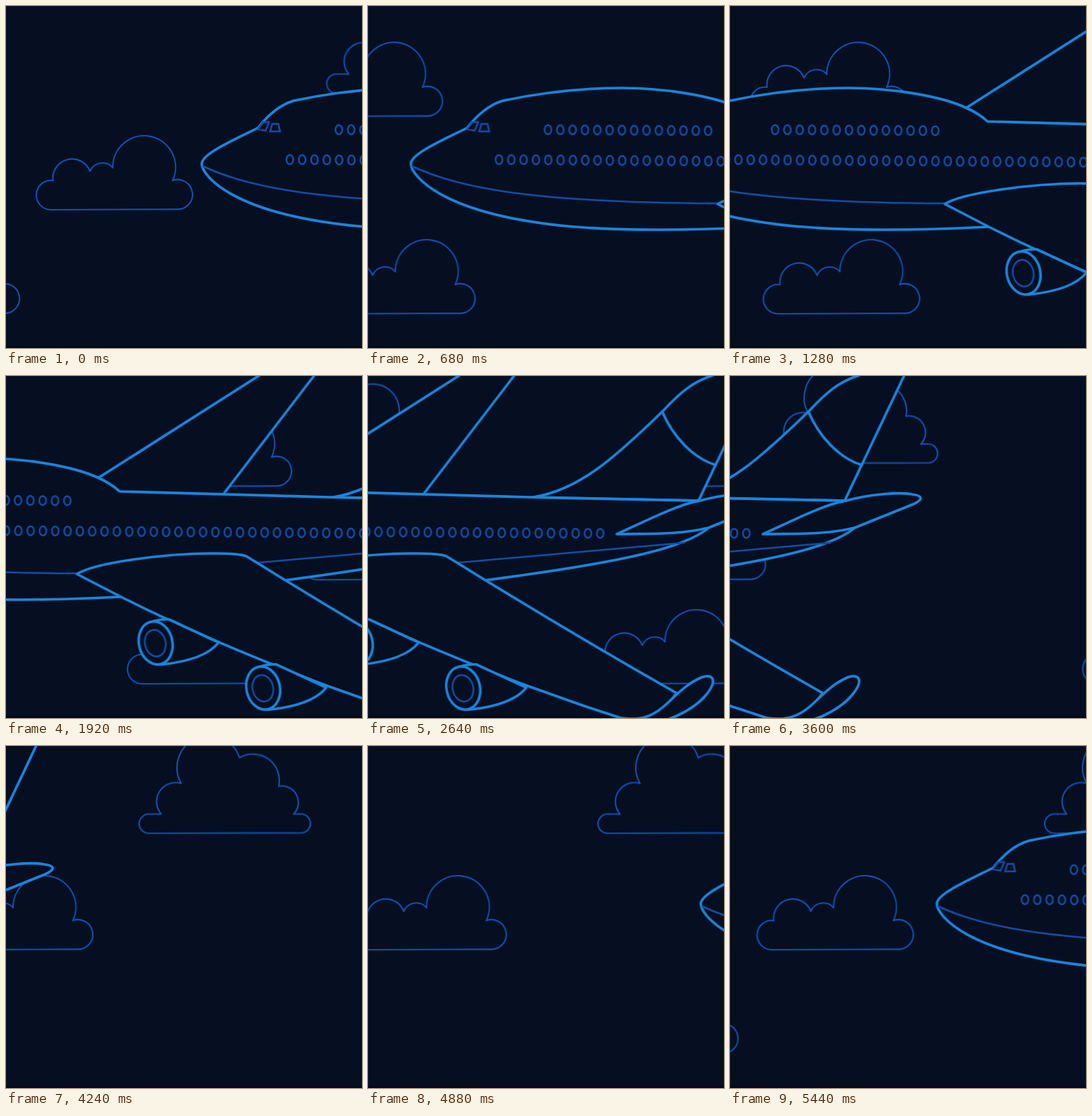
An HTML page for the animation above (5480 ms loop, 500 by 480 pixels).

```html
<!DOCTYPE html>
<html lang="en">
<head>
<meta charset="utf-8">
<title>Airliner in the clouds</title>
<style>
  html, body { margin: 0; width: 100%; height: 100%; overflow: hidden; background: #050f21; }
  svg { display: block; width: 500px; height: 480px; overflow: hidden; }

  .sky { fill: #050f21; }
  .edge { fill: none; stroke: #0e1829; }
  .floor { fill: #030916; }

  .cloud { fill: none; stroke: #124fae; stroke-width: 2.1; stroke-linejoin: round; }
  .body { fill: #050f21; stroke: #1886de; stroke-width: 3.6; stroke-linejoin: round; stroke-linecap: round; }
  .line { fill: none; }
  .trim { fill: none; stroke: #124da4; stroke-width: 2.5; stroke-linecap: round; }

  /* every part drifts from --a to --b at a constant speed, 25 pictures a second */
  .drift { animation: drift 5480ms steps(137) -10ms infinite; }
  @keyframes drift {
    from { transform: translateX(var(--a)); }
    to { transform: translateX(var(--b)); }
  }
</style>
</head>
<body>
<svg width="500" height="480">
  <defs>
    <path id="puff" class="cloud" d="M20 0A20.6 20.6 0 1 1 23 -41A27 27 0 0 1 75 -54A19 19 0 0 1 107 -59
      A44.1 44.1 0 1 1 191 -41A20.8 20.8 0 1 1 197 -.7Z"/>
    <path id="heap" class="cloud" d="M13.5 0A13.5 13.5 0 0 1 13.5 -27H31A26.7 26.7 0 0 1 59 -70A45 45 0 1 1 141 -106
      A37 37 0 0 1 196 -66A23.2 23.2 0 0 1 217 -27H229.5A13.4 13.4 0 0 1 229.5 -.6Z"/>

    <g id="engine">
      <path class="body" d="M811 345Q822 341 835 341.5L905 374Q885 399 824 405Z"/>
      <ellipse class="body" cx="816.5" cy="374.7" rx="23.5" ry="30.5" transform="rotate(-13 816.5 374.7)"/>
      <ellipse class="trim" cx="816" cy="375" rx="14.5" ry="18.8" transform="rotate(-13 816 375)"/>
    </g>

    <g id="plane">
      <!-- far wing -->
      <path class="body" d="M736 143L978 -11H1047L911.5 166L766 170Z"/>
      <!-- tail fin -->
      <path class="body" d="M1066 170C1130 160 1180 115 1248 49C1272 23 1290 8 1318 -1L1340 -8H1385L1298 175Z"/>
      <path class="body line" d="M1247 50C1262 85 1290 115 1322 125"/>
      <!-- fuselage -->
      <path class="body" d="M354 171C368 153 384 139 404 133C455 122 515 115 572 115C630 115 700 126 736 143
        C748 148 758 155 766 162L1106 171.3L1298 175L1312 213C1300 224 1270 237 1237 245.5
        C1180 261 1080 276 1000 286.5L766 310C690 314 590 317 500 309.5C310 292 274 234 275 221
        C276 207 320 188 354 171Z"/>
      <path class="trim" d="M277 225C330 250 420 276 706 277M960 262L1278 234"/>
      <path class="trim" d="M361 163H369.5L364.5 175L354 173ZM374 165.5H382.5L385 176H371Z"/>
      <g id="windows"></g>
      <!-- tailplane -->
      <path class="body" d="M1183 222C1225 203 1270 180 1298 175.5C1335 165 1375 163 1392 166
        C1408 168 1409 173 1394 180L1312 213C1270 223 1230 221 1183 222Z"/>
      <!-- near wing, winglet and engines -->
      <path class="body" d="M706 278C730 262 830 249 896 249Q936 249 944 253Q1115 359 1267 445L1240 482H1195
        L1137 463L1058 435C950 394 850 352 766 309Z"/>
      <path class="body" d="M1190 480C1222 485 1240 473 1255 458.5C1270 444 1285 430 1302 423
        C1320 416.5 1324 429 1309 447C1290 470 1250 489 1215 490Z"/>
      <use href="#engine"/>
      <use href="#engine" x="151" y="63.3"/>
    </g>
  </defs>

  <rect class="sky" width="500" height="480"/>
  <rect class="edge" x=".5" y=".5" width="499" height="490"/>
  <rect class="floor" y="477" width="500" height="3"/>

  <!-- parts on screen at the loop seam come as a leaving and an arriving copy -->
  <use class="drift" href="#puff" y="286" style="--a:43px;--b:1112px"/>
  <use class="drift" href="#puff" y="286" style="--a:-576px;--b:43px"/>
  <use class="drift" href="#puff" y="432" style="--a:-200px;--b:859px"/>
  <use class="drift" href="#puff" y="432" style="--a:-1259px;--b:-200px"/>
  <use class="drift" href="#puff" y="155" style="--a:-277px;--b:1033px"/>
  <use class="drift" href="#heap" y="122.5" style="--a:450.5px;--b:1615px"/>
  <use class="drift" href="#heap" y="122.5" style="--a:-714px;--b:450.5px"/>
  <use class="drift" href="#plane" style="--a:0px;--b:-1730.6px"/>
  <use class="drift" href="#plane" style="--a:1733.5px;--b:2.9px"/>
</svg>
<script>
  const row = (count, x, y, rise) => Array.from({ length: count }, (_, i) =>
    `<ellipse class="trim" cx="${x + i * 17.3}" cy="${y + i * rise}" rx="4.8" ry="6.4"/>`).join('');
  document.getElementById('windows').innerHTML =
    row(14, 467.5, 173.6, 0.11) + row(45, 398.7, 215.6, 0.122);
</script>
</body>
</html>
```
